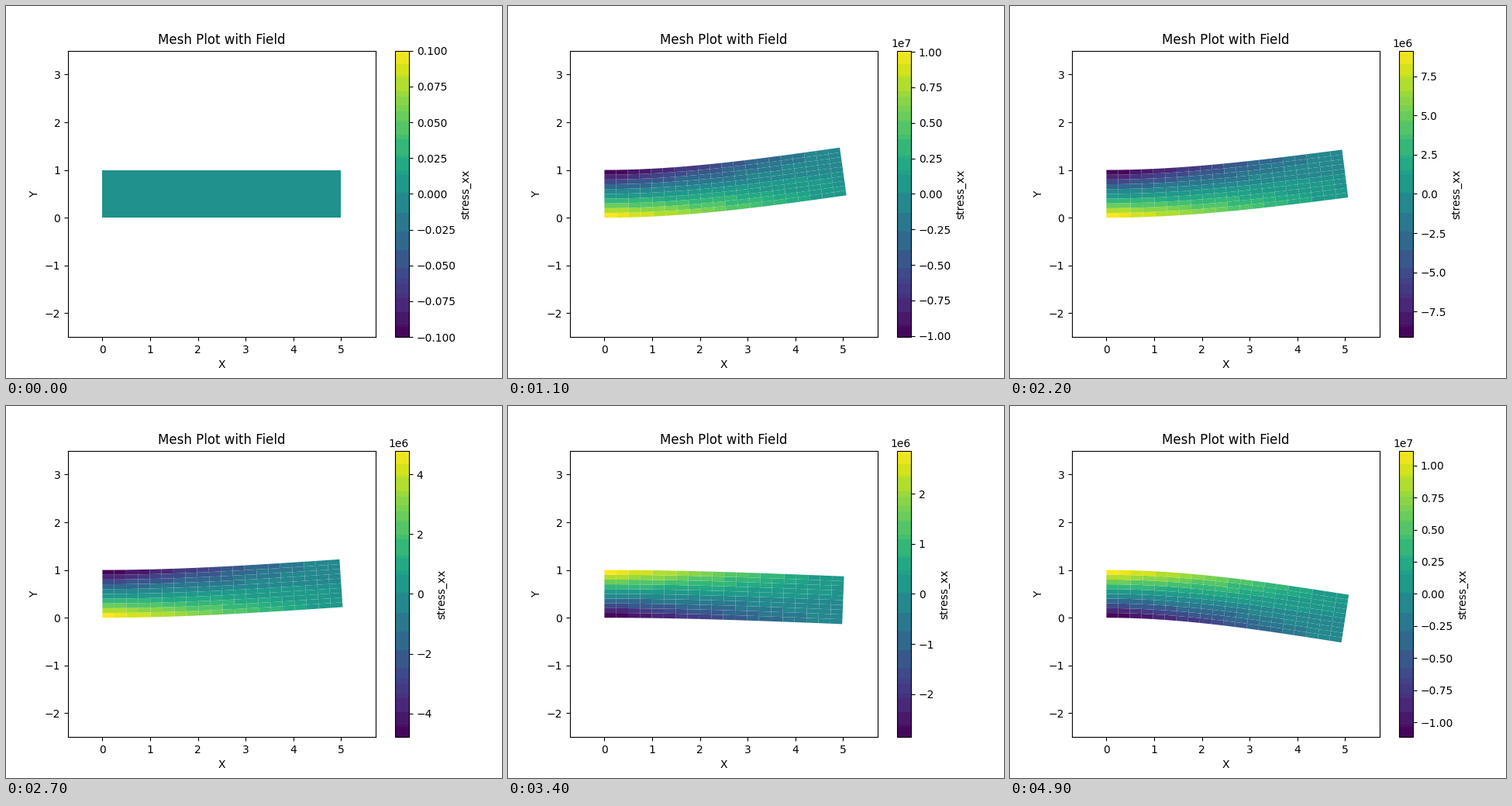
A matplotlib script that plays this animation: 640 px wide and 480 px high, repeating every 5 s.

```python
import numpy as np
import matplotlib.pyplot as plt
from matplotlib.animation import FuncAnimation
from matplotlib.collections import PolyCollection
from matplotlib.colors import ListedColormap

LENGTH, HEIGHT = 5.0, 1.0
COLS, ROWS = 20, 10
FRAMES, INTERVAL = 50, 100
TIP_DEFLECTION = 0.5285
PEAK_STRESS = 1.1355e7
STIFFENING = 0.0165


def banded_viridis():
    """Viridis reduced to coarse colour buckets, each shown as its mean."""
    colors = plt.get_cmap("viridis")(np.arange(256))[:, :3]
    red, green, blue = (colors * 255).astype(int).T
    bucket = (red // 32) * 1000 + (green // 16) * 10 + blue // 32
    _, index = np.unique(bucket, return_inverse=True)
    means = np.array([colors[index == k].mean(axis=0) for k in range(index.max() + 1)])
    return ListedColormap(means[index])


CMAP = banded_viridis()
X, Y = np.meshgrid(np.linspace(0, LENGTH, COLS + 1), np.linspace(0, HEIGHT, ROWS + 1))


def response(frame):
    """Relative beam response to a sinusoidal load, slightly nonlinear."""
    load = np.sin(0.1 * frame)
    return load * (1 + STIFFENING * load**2) / (1 + STIFFENING)


def deformed_cells(amount):
    tip = TIP_DEFLECTION * amount
    deflection = tip * (3 * LENGTH * X**2 - X**3) / (2 * LENGTH**3)
    slope = tip * (6 * LENGTH * X - 3 * X**2) / (2 * LENGTH**3)
    points = np.stack([X - (Y - HEIGHT / 2) * slope, Y + deflection], axis=-1)
    corners = [points[:-1, :-1], points[:-1, 1:], points[1:, 1:], points[1:, :-1]]
    return np.stack(corners, axis=2).reshape(-1, 4, 2)


def cell_stress(amount):
    xc = (X[:-1, :-1] + X[1:, 1:]) / 2
    yc = (Y[:-1, :-1] + Y[1:, 1:]) / 2
    moment = (LENGTH - xc) * (HEIGHT / 2 - yc)
    return (PEAK_STRESS * amount * moment / moment.max()).ravel()


def draw(frame):
    fig.clear()
    ax = fig.add_subplot()
    amount = response(frame)
    stress = cell_stress(amount)
    limit = np.abs(stress).max() or 0.1

    mesh = PolyCollection(deformed_cells(amount), cmap=CMAP, edgecolors="none")
    mesh.set_array(stress)
    mesh.set_clim(-limit, limit)
    ax.add_collection(mesh)
    fig.colorbar(mesh, ax=ax, label="stress_xx")

    # Equal scale on both axes, centred on the beam.
    box = ax.get_position()
    half_width = 3 * (box.width * 640) / (box.height * 480)
    ax.set(
        xlim=(LENGTH / 2 - half_width, LENGTH / 2 + half_width),
        ylim=(-2.5, 3.5),
        xlabel="X",
        ylabel="Y",
        title="Mesh Plot with Field",
    )
    return []


fig = plt.figure(figsize=(6.4, 4.8), dpi=100)
animation = FuncAnimation(
    fig, draw, frames=FRAMES, interval=INTERVAL, repeat=True, repeat_delay=0
)
plt.show()
```
